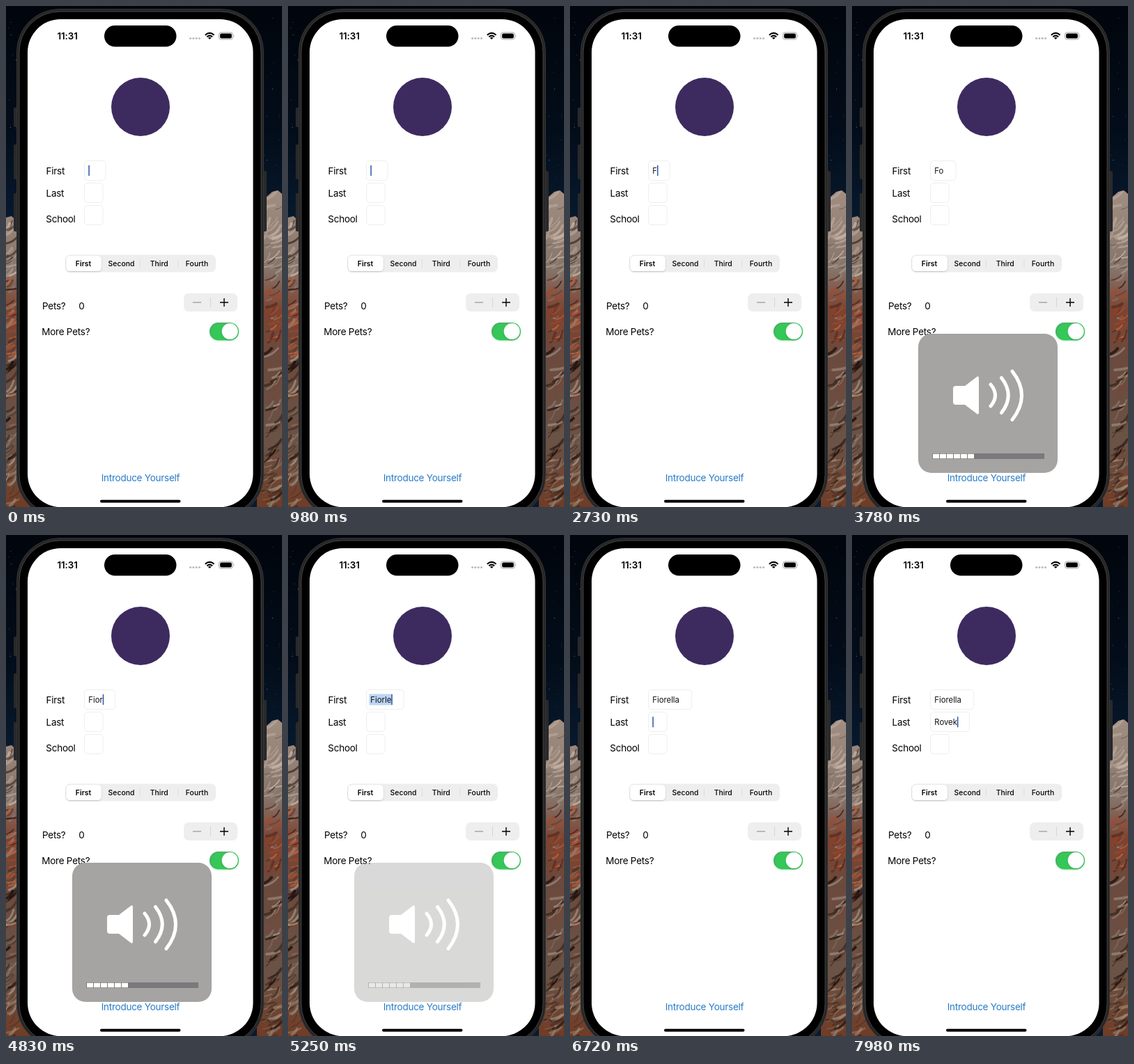
Write an HTML page that moves like this. It is 396x720 px and loops after 8 s.

```html
<!DOCTYPE html>
<html lang="en">
<head>
<meta charset="utf-8">
<title>Introduce yourself form</title>
<style>
html, body { margin: 0; width: 100%; height: 100%; overflow: hidden; background: #040b16; }
svg { display: block; width: 396px; height: 720px; }
text { font-family: Inter, "Liberation Sans", sans-serif; }
.label { font-size: 13.5px; letter-spacing: -.25px; }
.input { font-size: 11.3px; fill: #111; }
.seg { font-size: 10.4px; font-weight: 500; text-anchor: middle; }
.field { fill: #fff; stroke: #eeeeef; }
</style>
</head>
<body>
<svg viewBox="0 0 396 720">
  <defs>
    <linearGradient id="sky" x2="0" y2="1">
      <stop offset="0" stop-color="#01050c"/>
      <stop offset=".25" stop-color="#030d1a"/>
      <stop offset=".45" stop-color="#081b30"/>
    </linearGradient>
    <linearGradient id="rock" x2="0" y2="1">
      <stop offset="0" stop-color="#a28f82"/>
      <stop offset=".25" stop-color="#85746a"/>
      <stop offset=".38" stop-color="#7d4330"/>
      <stop offset=".52" stop-color="#6b4a3d"/>
      <stop offset=".8" stop-color="#6a5346"/>
      <stop offset="1" stop-color="#703c25"/>
    </linearGradient>
    <clipPath id="cliffs">
      <path d="M0 304L8 302L16 310L40 320V720H0Z"/>
      <path d="M360 285L372 276L382 267L390 265L396 270V720H360Z"/>
    </clipPath>
    <filter id="lift" x="-30%" y="-30%" width="160%" height="170%">
      <feDropShadow dx="0" dy="1" stdDeviation="1.3" flood-opacity=".2"/>
    </filter>
    <filter id="glow" x="-20%" y="-30%" width="140%" height="160%">
      <feDropShadow dx="0" dy=".5" stdDeviation="1.2" flood-color="#34c759" flood-opacity=".4"/>
    </filter>
  </defs>

  <rect width="396" height="720" fill="url(#sky)"/>
  <g id="stars" fill="#8fa3bb"></g>
  <g clip-path="url(#cliffs)">
    <rect y="265" width="396" height="455" fill="url(#rock)"/>
    <g id="strata" fill="none" stroke-linecap="round"></g>
  </g>

  <g fill="#29292b">
    <rect x="11" y="146" width="7" height="28" rx="2"/>
    <rect x="11" y="199" width="7" height="50" rx="2"/>
    <rect x="11" y="269" width="7" height="55" rx="2"/>
    <rect x="367" y="237" width="7" height="87" rx="2"/>
  </g>
  <rect x="15.5" y="4.5" width="354" height="731" rx="61" fill="#262627" stroke="#333334"/>
  <rect x="19" y="8" width="347" height="724" rx="58" fill="#000" stroke="#454546"/>
  <rect x="31" y="19" width="323.5" height="701" rx="47.5" fill="#fff"/>

  <text x="73.5" y="48" font-size="13.4" font-weight="600" letter-spacing="-.1">11:31</text>
  <rect x="141" y="28" width="103.5" height="30.5" rx="15.2"/>
  <g fill="#bdbdbd">
    <circle cx="264.6" cy="46.5" r="1.6"/><circle cx="268.9" cy="46.5" r="1.6"/>
    <circle cx="273.2" cy="46.5" r="1.6"/><circle cx="277.5" cy="46.5" r="1.6"/>
  </g>
  <g fill="none" stroke="#000" stroke-width="2.1">
    <path d="M285.8 41.7Q292.2 36.2 298.6 41.7M288.3 44.4Q292.2 41 296.1 44.4"/>
    <path d="M289.9 45.7Q292.2 44 294.5 45.7L292.2 48.1Z" fill="#000" stroke="none"/>
  </g>
  <rect x="305.5" y="38" width="20" height="10" rx="3.2" fill="none" stroke="#a5a5a5"/>
  <rect x="307.1" y="39.6" width="16.8" height="6.8" rx="2"/>
  <path d="M326.8 41.3Q328.4 43 326.8 44.7Z" fill="#a5a5a5"/>

  <circle cx="193" cy="145" r="42" fill="#3d2b60"/>

  <g class="label">
    <text x="57.5" y="241.5">First</text>
    <text x="57.5" y="273.5">Last</text>
    <text x="57.3" y="311.3">School</text>
    <text x="52" y="436">Pets?</text>
    <text x="104.3" y="435.5">0</text>
    <text x="51.3" y="472.5">More Pets?</text>
    <text x="193" y="683.3" text-anchor="middle" fill="#277bc8">Introduce Yourself</text>
  </g>

  <rect class="field" id="firstBox" x="112.5" y="222.5" height="28" rx="4.5"/>
  <rect class="field" id="lastBox" x="112.5" y="254.5" height="28" rx="4.5"/>
  <rect class="field" x="112.5" y="286.5" width="26.5" height="28" rx="4.5"/>
  <rect id="selection" x="116.5" y="228.5" height="16" fill="#bcd5f4"/>
  <text class="input" id="first" x="118.3" y="240.8"></text>
  <text class="input" id="last" x="118.3" y="273.1"></text>
  <rect id="caret" width="1.6" height="15.5" rx=".8" fill="#3560ae"/>

  <rect x="85" y="357.5" width="216" height="25" rx="7" fill="#eeeeef"/>
  <path d="M192.5 364V376M247 364V376" stroke="#dcdcde"/>
  <rect x="86.3" y="359" width="50.5" height="22" rx="5.5" fill="#fff" filter="url(#lift)"/>
  <g class="seg">
    <text x="111" y="374" font-weight="600">First</text>
    <text x="165.5" y="374">Second</text>
    <text x="219.7" y="374">Third</text>
    <text x="274" y="374">Fourth</text>
  </g>

  <rect x="255" y="413" width="77" height="26" rx="7" fill="#eeeeef"/>
  <path d="M293.5 419V433" stroke="#d6d6d8"/>
  <path d="M268 426H280" stroke="#9b9b9d" stroke-width="1.3"/>
  <path d="M307 426H319M313 420V432" stroke="#000" stroke-width="1.4"/>

  <rect x="292" y="455" width="42" height="25.5" rx="12.75" fill="#34c759" filter="url(#glow)"/>
  <path d="M296 475A12 12 0 0 1 304.7 455.7H321" fill="none" stroke="#5c9f6d" stroke-width="1.2"/>
  <circle cx="321.2" cy="467.6" r="11.5" fill="#fff" filter="url(#lift)"/>

  <rect x="135" y="709.7" width="115.5" height="4" rx="2"/>

  <g id="panel">
    <rect x="95" y="471" width="200" height="200" rx="19" fill="#a5a4a3"/>
    <path d="M149 546H162L179 533Q182 531 182 535V584Q182 588 179 586L162 573H149Q145 573 145 569V550Q145 546 149 546Z" fill="#fff"/>
    <path d="M199 544Q212 559.5 199 575M214.5 534.5Q234 559.5 214.5 584.5M230 525Q257 559.5 230 594.5"
      fill="none" stroke="#fff" stroke-width="5" stroke-linecap="round"/>
  </g>
  <g id="level">
    <rect x="115" y="643" width="161" height="8" fill="#7b797b"/>
    <path d="M116 647H175.5" stroke="#fff" stroke-width="6.6" stroke-dasharray="9 1"/>
  </g>
</svg>
<script>
const LOOP = 8000, STEP = 70, TEXT_X = 118.3;
const $ = id => document.getElementById(id);

// [time, text]
const firstTyping = [
  [0, ""], [2730, "F"], [3010, "Fo"], [4410, "F"], [4480, "Fi"], [4550, "Fio"],
  [4760, "Fior"], [4970, "Fiorl"], [5110, "Fiorle"], [5390, "Fiorel"], [5600, "Fiorella"]
];
const lastTyping = [
  [0, ""], [7070, "R"], [7350, "Ro"], [7560, "Rov"], [7630, "Rove"], [7770, "Rovek"]
];
// [start, end, final opacity]
const caretFades = [
  [280, 490, 0], [630, 840, 1], [1260, 1470, 0], [1540, 1680, 1], [1960, 2100, 0],
  [2170, 2310, 1], [3430, 3640, 0], [3780, 3850, 1], [6020, 6300, 0], [6440, 6510, 1]
];

const clamp = v => Math.max(0, Math.min(1, v));
const textAt = (typing, t) => typing.filter(([at]) => at <= t).pop()[1];

function caretOpacity(t) {
  return caretFades.reduce((value, [start, end, to]) =>
    value + (to - value) * clamp((t - start) / (end - start)), 1);
}

function setField(name, text, minWidth) {
  $(name).textContent = text;
  const width = text ? $(name).getComputedTextLength() : 0;
  $(name + "Box").setAttribute("width", Math.max(minWidth, width + 23.5));
  return width;
}

// The level bar outlasts the panel and lingers faintly before it goes.
function drawVolume(t) {
  const shown = t >= 3500 && t < 5600 ? 1 : 0;
  const fadeTime = Math.min(t, 5460);
  $("panel").setAttribute("opacity", shown * clamp((5460 - fadeTime) / 512));
  $("level").setAttribute("opacity", shown * clamp((5523 - fadeTime) / 660));
}

function draw(time) {
  const t = Math.floor(time % LOOP / STEP) * STEP;
  const firstWidth = setField("first", textAt(firstTyping, t), 30.5);
  const lastWidth = setField("last", textAt(lastTyping, t), 26.5);

  const onLast = t >= 6440;
  $("caret").setAttribute("x", TEXT_X + (onLast ? lastWidth : firstWidth));
  $("caret").setAttribute("y", onLast ? 261 : 228.7);
  $("caret").setAttribute("opacity", caretOpacity(t));

  $("selection").setAttribute("width", firstWidth + 3);
  $("selection").setAttribute("opacity", t >= 5180 && t < 5390 ? 1 : 0);

  drawVolume(t);
}

function seeded(seed) {
  return () => (seed = seed * 16807 % 2147483647) / 2147483647;
}

function paintScenery() {
  const rnd = seeded(4127);
  const pale = ["#c4b3a5", "#9d8c80", "#4a3830", "#b5a294"];
  const rust = ["#a8462a", "#2c1712", "#8f8078", "#5b3024", "#c0603a"];
  const earth = ["#8d7c70", "#3a2720", "#7b4630", "#a0907f", "#20130f"];
  let stars = "", strata = "";
  for (let i = 0; i < 26; i++) {
    const x = i % 2 ? rnd() * 15 : 371 + rnd() * 25;
    stars += `<circle cx="${x}" cy="${rnd() * 250}" r="${.3 + rnd() * .4}" opacity="${.3 + rnd() * .6}"/>`;
  }
  for (let i = 0; i < 240; i++) {
    const x = i % 2 ? -6 + rnd() * 12 : 368 + rnd() * 20;
    const y = 270 + rnd() * 455;
    const tones = y < 390 ? pale : y < 510 ? rust : earth;
    const tone = tones[Math.floor(rnd() * tones.length)];
    const run = 6 + rnd() * 14, rise = 2 + rnd() * 14;
    strata += `<path d="M${x} ${y}q${run * .6} ${-rise * .2} ${run} ${-rise}" stroke="${tone}"
      stroke-width="${.8 + rnd() * 3.4}" opacity="${.4 + rnd() * .5}"/>`;
  }
  $("stars").innerHTML = stars;
  $("strata").innerHTML = strata;
}

paintScenery();
const begin = performance.now();
function frame() {
  draw(performance.now() - begin);
  requestAnimationFrame(frame);
}
frame();
</script>
</body>
</html>
```
